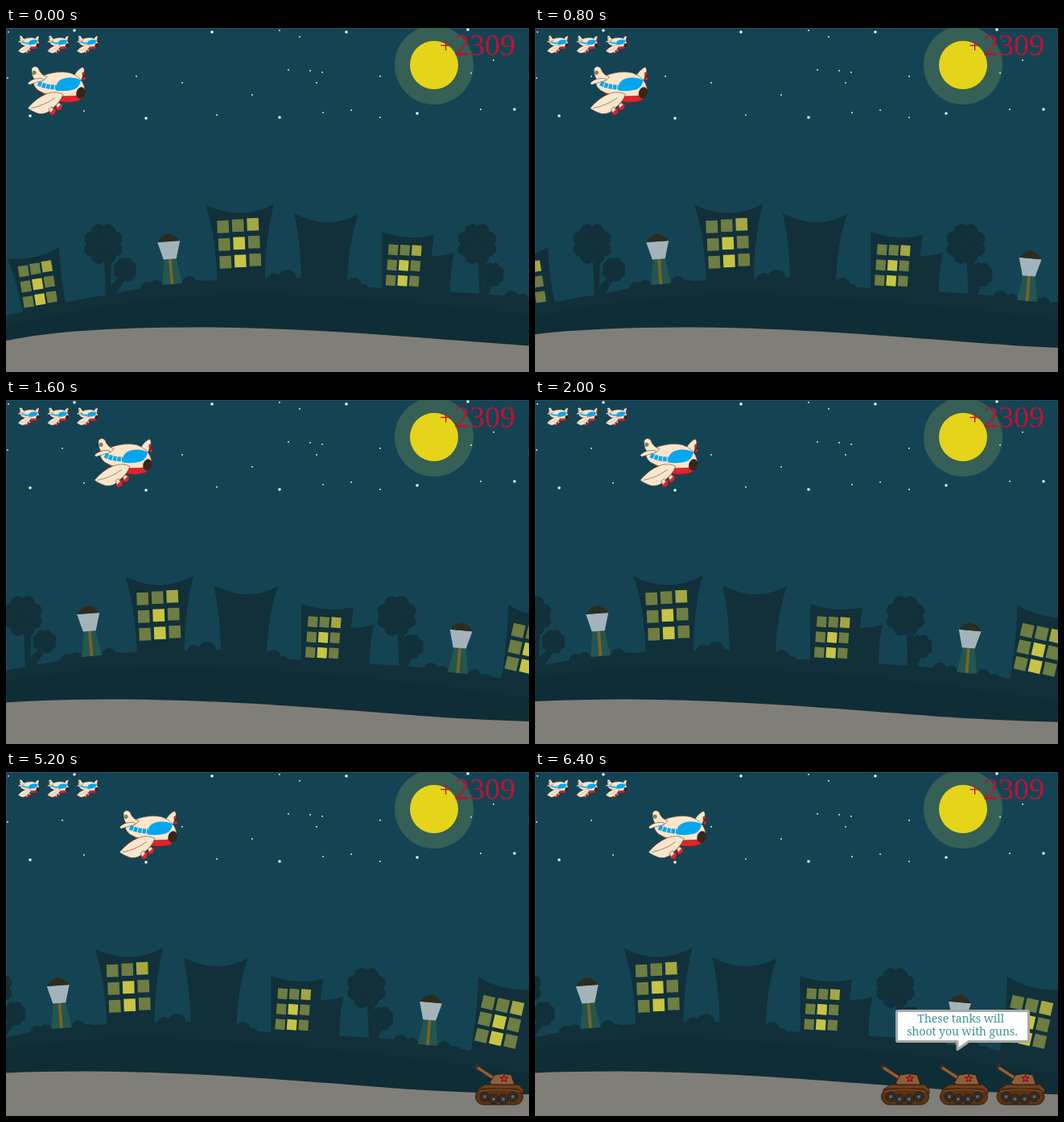
Write an HTML page that moves like this. It is 650 by 427 pixels and loops after 8 s.

```html
<!DOCTYPE html>
<html lang="en">
<head>
<meta charset="utf-8">
<title>Night flight</title>
<style>
  html, body { margin: 0; width: 100%; height: 100%; overflow: hidden; background: #144453; }
  svg { display: block; width: 100vw; height: 100vh; }
  .speech { font: 14px "Noto Serif", serif; fill: #3f9594; text-anchor: middle; }
  .score { font: 38px "Liberation Serif", "Times New Roman", serif; fill: #bd1334; }
  .bubble { fill: #fff; stroke: #a9a9a9; stroke-width: 3; stroke-linejoin: round; }
  .dark { fill: #11303a; }
</style>
</head>
<body>
<svg viewBox="0 0 650 427" preserveAspectRatio="none">
  <defs>
    <g id="plane" stroke="#3b2a22" stroke-width=".5" stroke-linejoin="round">
      <path fill="#fbe5cb" d="M57 13Q62 5 68 2Q71 3 70 9L66 20Z"/>
      <path fill="#e3222b" d="M68 9l3-1v3l-3 2zM68 15l4-1v4l-4 1z"/>
      <path fill="#e3222b" d="M8 22Q12 31 23 38Q42 50 63 44Q72 39 71 29L40 30Z"/>
      <path fill="#fbe5cb" d="M7 22Q9 15 18 13Q36 6 52 9Q68 14 71 29Q67 39 52 38Q28 40 13 31Q8 27 7 22Z"/>
      <path fill="#fbe5cb" d="M10 20Q4 13 5 4Q8-1 13 3Q16 12 24 14Q21 20 10 20Z"/>
      <path fill="#fbe5cb" d="M0 22Q5 16 15 16Q21 16 19 19Q10 21 2 24Z"/>
      <path fill="#04a7ec" stroke="none" d="M35 26Q37 18 45 16Q56 13 66 18Q65 27 57 30Q46 33 35 31Z"/>
      <path fill="none" stroke="#04a7ec" stroke-width="6" stroke-dasharray="4.4 1" d="M13 22Q23 27 35 27"/>
      <ellipse cx="66" cy="34" rx="5.3" ry="7" fill="#38251b" transform="rotate(16 66 34)"/>
      <g fill="#e3222b">
        <ellipse cx="31" cy="57" rx="4" ry="5" transform="rotate(30 31 57)"/>
        <ellipse cx="39" cy="51" rx="4" ry="5" transform="rotate(30 39 51)"/>
      </g>
      <path fill="#fbe5cb" d="M0 53Q11 40 24 35Q36 31 44 36Q41 45 31 53Q24 61 14 60Q5 57 0 53Z"/>
      <path fill="none" d="M4 53Q20 50 34 40"/>
      <path fill="#fbe5cb" d="M26 54l4-3 2 4-4 4zM35 49l4-3 2 3-4 4z"/>
      <circle cx="8" cy="9" r="2.4" fill="#4a9a63" stroke="#d8543c"/>
    </g>
    <g id="tank" stroke="#2b1709" stroke-width=".9" stroke-linejoin="round">
      <path d="M3 4L23 17" stroke="#3a2113" stroke-width="5"/>
      <path d="M3 4L23 17" stroke="#8f5f3d" stroke-width="3.4"/>
      <path d="M0 5L4 0" stroke="#4b2b18" stroke-width="3"/>
      <path fill="#6f4120" d="M3 31L12 25H54L60 31V36H3Z"/>
      <path fill="#8f5f3d" d="M18 23L24 13Q35 10 45 13L49 25H21Z"/>
      <rect x=".5" y="30" width="59" height="20" rx="10" fill="#5d3312"/>
      <path fill="none" stroke="#8a5528" d="M4 34Q30 28 56 34"/>
      <g id="wheels"></g>
      <path id="redStar" fill="#ee2035" stroke="#471016"/>
    </g>
  </defs>

  <rect width="650" height="427" fill="#144453"/>
  <path d="M.5 427V.5H650" fill="none" stroke="#2b5967" opacity=".7"/>
  <circle cx="532" cy="46" r="49" fill="#365f55"/>
  <circle cx="532" cy="46" r="30" fill="#e6d41a"/>
  <g id="stars" fill="#eef6f8"></g>

  <g id="world">
    <g id="skyline"></g>
    <path class="dark" d="M-5 358Q70 340 137 329Q200 316 262 313Q340 307 430 321Q500 324 560 328Q630 331 700 343Q750 352 800 362V427H-5Z"/>
    <path fill="#0f2d37" d="M-5 371Q150 331 310 330Q520 334 800 377V427H-5Z"/>
    <g id="bushes" class="dark"></g>
    <g id="lamps"></g>
    <path fill="#807e78" d="M-5 389.5Q70 371.5 240 371.5C390 372 540 387 650 394.5Q720 398.5 800 400.5V427H-5Z"/>
  </g>

  <use href="#plane" transform="translate(15 9) scale(.37)"/>
  <use href="#plane" transform="translate(51.5 9) scale(.37)"/>
  <use href="#plane" transform="translate(88 9) scale(.37)"/>
  <text class="score"><tspan x="539" y="31" font-size="27">+</tspan><tspan x="557" y="33.5">2309</tspan></text>

  <use id="hero" href="#plane"/>
  <g id="tanks">
    <use href="#tank"/>
    <use href="#tank" x="73"/>
    <use href="#tank" x="143.5"/>
  </g>

  <g id="welcome">
    <path class="bubble" d="M237 21.5H414Q417.5 21.5 417.5 25V81Q417.5 85 414 85H333L318 101V85H237Q233.5 85 233.5 81V25Q233.5 21.5 237 21.5Z"/>
    <text class="speech">
      <tspan x="326" y="44">Welcome, our hero!</tspan>
      <tspan x="326" y="59">You are about to protect</tspan>
      <tspan x="326" y="74">this city from the hunters.</tspan>
    </text>
  </g>
  <g id="warning">
    <path class="bubble" d="M451 296.5H612Q613.5 296.5 613.5 298V333Q613.5 334.500 612 334.500H539L525 344.500V334.500H451Q449.500 334.500 449.500 333V298Q449.500 296.500 451 296.500Z"/>
    <text class="speech">
      <tspan x="531" y="311">These tanks will</tspan>
      <tspan x="531" y="326.500">shoot you with guns.</tspan>
    </text>
  </g>
</svg>
<script>
const $ = id => document.getElementById(id);
const circle = (x, y, r, extra = '') => `<circle cx="${x}" cy="${y}" r="${r}" ${extra}/>`;
const dark = d => `<path class="dark" d="${d}"/>`;

// Nine panes on a sheared grid; (x, y) is the centre of the middle pane.
function panes(x, y, size, angle, across, down) {
  const tints = ['#6e7d42', '#6e7d42', '#a4a742', '#6e7d42', '#c7c445', '#6e7d42', '#6e7d42', '#c7c445', '#6e7d42'];
  return tints.map((tint, i) => {
    const col = i % 3 - 1, row = Math.floor(i / 3) - 1;
    const px = x + col * across[0] + row * down[0];
    const py = y + col * across[1] + row * down[1];
    return `<rect x="${-size / 2}" y="${-size / 2}" width="${size - .5}" height="${size + .5}" fill="${tint}"
      transform="translate(${px} ${py}) rotate(${angle})"/>`;
  }).join('');
}

function foliage(x, y, r) {
  let out = circle(x, y, r * .8);
  for (let i = 0; i < 8; i++) {
    const a = (i + .5) * Math.PI / 4;
    out += circle(x + Math.cos(a) * r * .64, y + Math.sin(a) * r * .68, r * .36);
  }
  return out;
}

function tree(x, y, dx, dy) {
  return `<g class="dark">${foliage(x, y, 25)}${foliage(x + dx, y + dy, 15)}
    <path d="M${x + 1} ${y + 18}H${x + 10}L${x + 9} ${y + 52}L${x + dx - 4} ${y + dy + 6}L${x + dx + 2} ${y + dy + 9}L${x + 13} ${y + 66}H${x + 3}Z"/></g>`;
}

function lamp(x, y, angle) {
  return `<g transform="translate(${x} ${y}) rotate(${angle})">
    <path fill="#24564f" d="M-7 32H8L13 63H-12Z"/>
    <path fill="#766526" d="M-1.500 32H2L2.500 63H-1.500Z"/>
    <path fill="#a2b4ba" d="M-14 10H14L8 32H-8Z"/>
    <path fill="#2b2d20" d="M-14 10Q-9 2 0 0Q9 2 14 10Z"/></g>`;
}

$('skyline').innerHTML =
  dark('M2 286Q40 289 66 272Q67 310 77 352H21Q13 315 2 286Z') +
  panes(39.500, 317.500, 13, -9, [14.500, -3], [3, 19]) +
  dark('M248 219Q292 241 333 218Q321 265 322 325H263Q262 262 248 219Z') +
  panes(290, 267, 15, -2, [18.500, -1.500], [1.500, 22]) +
  dark('M358 230Q400 252 438 231Q423 275 424 330H367Q368 275 358 230Z') +
  dark('M467 253Q503 265 532 257Q526 295 526 335H467Z') +
  dark('M527 283Q543 283 557 279Q551 305 552 335H525Z') +
  panes(494.500, 294.500, 12.500, 4, [14.500, .5], [-1.500, 19]) +
  dark('M724.500 254Q755 274 800 270V370H711Q723 312 724.500 254Z') +
  panes(751, 310, 15.500, 13, [18, 3.500], [-4, 20.500]) +
  tree(121, 268, 27, 32) +
  tree(585.500, 268, 19, 38);

$('bushes').innerHTML = [
  [176, 324, 9], [187, 322, 9], [228, 317, 9], [240, 321, 8], [334, 313, 9], [350, 311, 11], [364, 318, 8],
  [432, 320, 10], [444, 325, 7], [628, 335, 9], [642, 338, 8], [682, 343, 9], [696, 348, 8]
].map(b => circle(...b)).join('');

$('lamps').innerHTML = lamp(201.500, 255, -4) + lamp(666.500, 276, 5);

$('stars').innerHTML = [
  [2, 62], [3, 5], [70, 60], [97, 103], [162, 60], [219, 68], [262, 108], [306, 83], [340, 3], [351, 52], [365, 11],
  [378, 53], [386, 68], [394, 105], [393, 55], [429, 102], [465, 60], [465, 111], [578, 56], [590, 101], [606, 40]
].map(([x, y]) => circle(x, y, .9)).join('') + [
  [30, 109], [85, 3], [174, 112], [256, 5], [340, 111], [423, 5], [511, 106], [574, 2], [632, 101]
].map(([x, y]) => circle(x, y, 1.800)).join('');

$('wheels').innerHTML = [[12, 40], [23, 43], [35, 43], [47, 40]].map(([x, y]) =>
  circle(x, y, 6, 'fill="#30302f"') + circle(x, y, 2.800, 'fill="#63605d"')).join('');

$('redStar').setAttribute('d', 'M' + Array.from({ length: 10 }, (_, i) => {
  const r = i % 2 ? 2 : 5, a = i * Math.PI / 5;
  return `${36 + r * Math.sin(a)} ${17.500 - r * Math.cos(a)}`;
}).join('L') + 'Z');

const LOOP = 8000, TICK = 200, HALT = 2200, TANKS_IN = 5200, TANKS_STOP = 6400;
const move = (id, x, y) => $(id).setAttribute('transform', `translate(${x} ${y})`);
const show = (id, on) => $(id).setAttribute('visibility', on ? 'visible' : 'hidden');

function render(t) {
  const flown = Math.floor(Math.min(t, HALT) / TICK);
  move('world', -12.500 * flown, 0);
  move('hero', 27 + 10.370 * flown, 46.500);

  const driven = Math.floor((Math.min(t, TANKS_STOP) - TANKS_IN) / TICK);
  move('tanks', 583 - 25.500 * driven, 363);
  show('tanks', t >= TANKS_IN);
  show('welcome', t >= HALT && t < TANKS_IN);
  show('warning', t >= TANKS_STOP);
}

const start = performance.now();
function frame() {
  render((performance.now() - start) % LOOP);
  requestAnimationFrame(frame);
}
frame();
</script>
</body>
</html>
```
